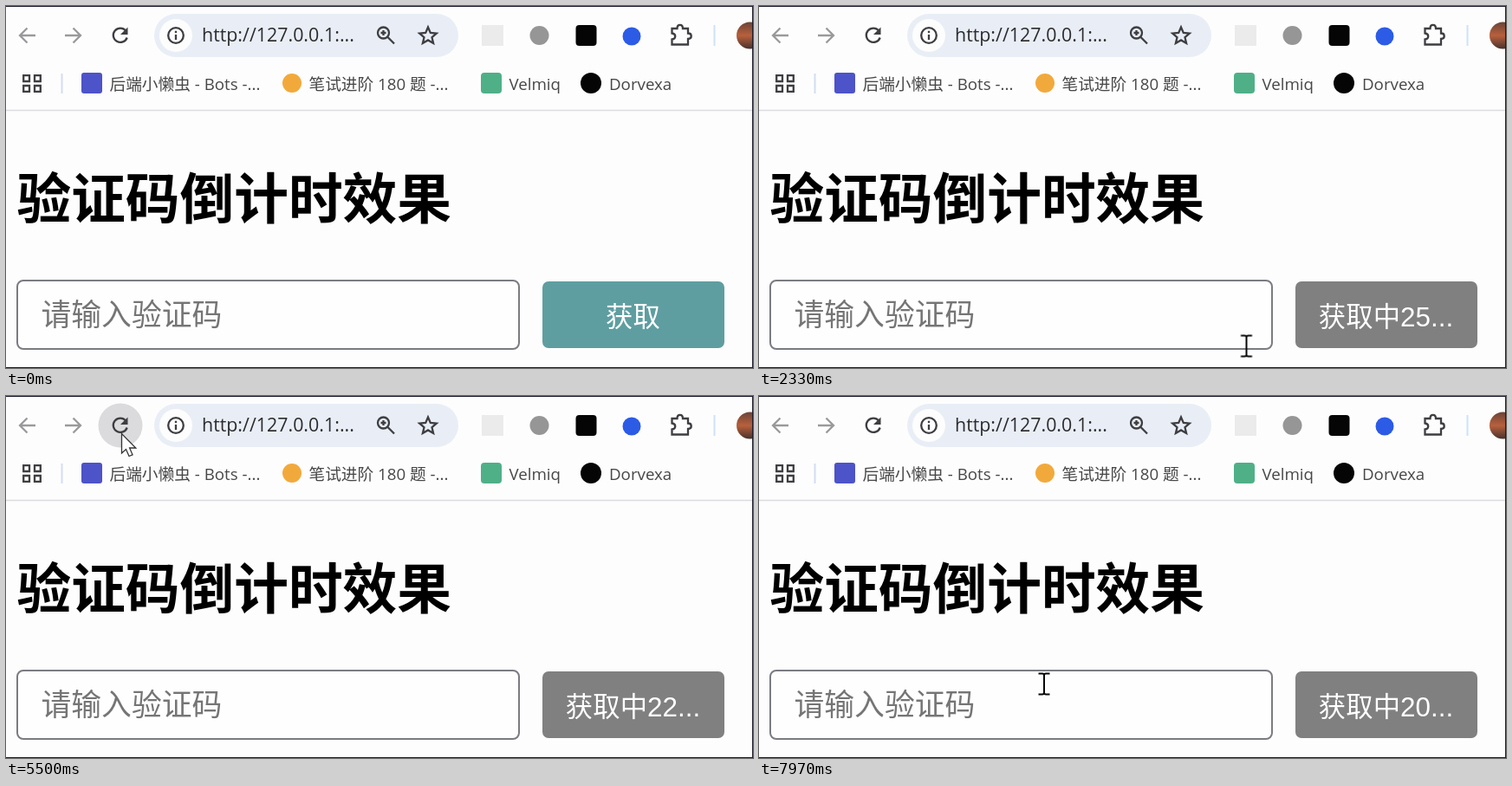
Animation, 862 px wide and 418 px high, one loop 8 s. Source, as an HTML page:

```html
<!DOCTYPE html>
<html lang="zh-CN">
<head>
<meta charset="utf-8">
<title>验证码倒计时效果</title>
<style>
  html, body { margin: 0; width: 100%; height: 100%; overflow: hidden; background: #fdfdfd; }
  svg { display: block; width: 862px; height: 418px; }
  text { font-family: "Open Sans", "Noto Sans CJK SC", sans-serif; }
  .mark { font-size: 18.7px; fill: #474747; }
  .url { font-size: 21.4px; fill: #2c2c30; }
  .title { font: 700 62.7px "Noto Sans CJK SC", sans-serif; fill: #000; }
  .hint { font: 34.8px "Noto Sans CJK SC", sans-serif; fill: #757575; }
  .label { font: 31.4px "Liberation Sans", "Noto Sans CJK SC", sans-serif; fill: #fff; text-anchor: middle; }
  .line { fill: none; stroke: #3e3e42; stroke-width: 2.3; }
  .pale { stroke: #9a9a9c; }

  .anim { animation: 8s step-end infinite; }
  .fade { animation: paint 8s linear infinite; }
  .move { animation: travel 8s linear infinite; }
  .strip { animation-name: count; }
  .hover { animation-name: hover; }
  .reload { animation-name: idle; }
  .stop { animation-name: busy; }
  .arrow { animation-name: arrow; }
  .beam { animation-name: beam; }
  .hand { animation-name: hand; }
  .deny { animation-name: deny; }

  @keyframes paint {
    0%, 18.75% { fill: #5f9ea0; }
    20.8%, 100% { fill: #808080; }
  }
  /* one 77px row per label */
  @keyframes count {
    0% { transform: translateY(0); }
    18.75% { transform: translateY(-77px); }
    32.125% { transform: translateY(-154px); }
    44.625% { transform: translateY(-231px); }
    57.125% { transform: translateY(-308px); }
    69.625% { transform: translateY(-385px); }
    98.75%, 100% { transform: translateY(-462px); }
  }
  @keyframes hover {
    0%, 74.6%, 100% { opacity: 0; }
    60.8% { opacity: 1; }
  }
  @keyframes idle {
    0%, 74.9%, 87.5%, 100% { opacity: 1; }
    73.1%, 86% { opacity: 0; }
  }
  @keyframes busy {
    0%, 74.9%, 87.5%, 100% { opacity: 0; }
    73.1%, 86% { opacity: 1; }
  }
  @keyframes travel {
    0%, 11.6% { transform: translate(649px, 420px); }
    14.6%, 26.6% { transform: translate(672px, 354px); }
    27.5% { transform: translate(652px, 349px); }
    29.125% { transform: translate(563px, 392px); }
    30.75% { transform: translate(497px, 405px); }
    32.5% { transform: translate(437px, 420px); }
    52.1%, 52.2% { transform: translate(243px, 397px); }
    61.25%, 74.4% { transform: translate(133px, 43px); }
    80.6%, 93.7% { transform: translate(113px, 396px); }
    99.4%, 100% { transform: translate(329px, 332px); }
  }
  @keyframes arrow {
    0%, 12.75%, 28.625%, 32.5%, 52.5%, 55.8%, 77%, 79.2%, 100% { opacity: 0; }
    11.625%, 28.125%, 29.8%, 52.125%, 54.2%, 57.45%, 78.1% { opacity: 1; }
  }
  @keyframes beam {
    0%, 29.8%, 54.2%, 57.45%, 78.1% { opacity: 0; }
    28.625%, 52.5%, 55.8%, 77%, 79.2%, 100% { opacity: 1; }
  }
  @keyframes hand {
    0%, 19.25%, 100% { opacity: 0; }
    12.75% { opacity: 1; }
  }
  @keyframes deny {
    0%, 28.125%, 100% { opacity: 0; }
    19.25% { opacity: 1; }
  }
</style>
</head>
<body>
<svg viewBox="0 0 862 418">
  <defs>
    <clipPath id="face"><rect x="619" y="318" width="210" height="77"/></clipPath>
    <linearGradient id="photo" x2="0" y2="1">
      <stop offset="0" stop-color="#6a4438"/>
      <stop offset=".5" stop-color="#b8603c"/>
      <stop offset="1" stop-color="#48322e"/>
    </linearGradient>
  </defs>
  <rect width="862" height="418" fill="#fdfdfd"/>

  <!-- toolbar -->
  <circle class="anim hover" cx="132" cy="34" r="25.5" fill="#dbdbdd"/>
  <path class="line pale" d="M34 34H16M24.5 25.5L16 34L24.5 42.5M68 34H86M77.5 25.5L86 34L77.5 42.5"/>
  <g class="anim reload">
    <path class="line" d="M138.3 28.5A8.2 8.2 0 1 0 139.7 36.5"/>
    <path d="M140.5 24.5V33H132Z" fill="#3e3e42"/>
  </g>
  <path class="line anim stop" d="M125.5 27.5L138.5 40.5M138.5 27.5L125.5 40.5"/>

  <rect x="171" y="9" width="351" height="50" rx="25" fill="#e9eef6"/>
  <circle cx="196" cy="34" r="19" fill="#fdfdfd"/>
  <circle class="line" cx="196" cy="34" r="8.8"/>
  <path class="line" d="M196 33V39M196 28.7V31"/>
  <text class="url" x="226" y="41">http://127.0.0.1:...</text>
  <circle class="line" cx="435.5" cy="31" r="6.5"/>
  <path class="line" d="M440.3 35.8L448 43.5M432.5 31H438.5M435.5 28V34"/>
  <path class="line" d="M487 24.5L489.8 31L496.8 31.6L491.5 36.2L493.1 43L487 39.4L480.9 43L482.5 36.2L477.2 31.6L484.2 31Z"/>

  <rect x="549" y="22" width="25" height="24" fill="#ebebeb"/>
  <circle cx="615.5" cy="34" r="11" fill="#969696"/>
  <rect x="657.5" y="22" width="24" height="24" rx="4" fill="#050505"/>
  <circle cx="722" cy="35" r="10.5" fill="#2c5be6"/>
  <path class="line" d="M768.5 26H774.5C774.5 20.5 781 20.5 781 26H787V31.5C792 31.5 792 38 787 38V44.5H768.5V38.5C773.5 38 773.5 32 768.5 31.5Z"/>
  <path d="M817.5 22V46" stroke="#cbe2fa" stroke-width="2"/>
  <circle cx="858.5" cy="34" r="15.5" fill="url(#photo)"/>

  <!-- bookmarks -->
  <path class="line" d="M20.2 80.2H27V87H20.2ZM33 80.2H39.8V87H33ZM20.2 92H27V98.8H20.2ZM33 92H39.8V98.8H33Z"/>
  <path d="M64.5 78V101" stroke="#d3dcf4" stroke-width="2"/>
  <rect x="87" y="77" width="24" height="24" rx="3" fill="#4d53c8"/>
  <text class="mark" x="119.5" y="97">后端小懒虫 - Bots -...</text>
  <circle cx="330" cy="89" r="11" fill="#f2a93c"/>
  <text class="mark" x="349.5" y="97">笔试进阶 180 题 -...</text>
  <rect x="548" y="77" width="24" height="24" rx="4" fill="#4fb088"/>
  <text class="mark" x="580.5" y="97">Velmiq</text>
  <circle cx="675" cy="89" r="12" fill="#050505"/>
  <text class="mark" x="696" y="97">Dorvexa</text>
  <path d="M0 120.5H862" stroke="#dcdce0" stroke-width="1.5"/>

  <!-- page -->
  <text class="title" x="12.5" y="245">验证码倒计时效果</text>
  <rect x="13" y="317" width="579" height="79" rx="7" fill="#fefefe" stroke="#7b7b82" stroke-width="2"/>
  <text class="hint" x="40.5" y="368.5">请输入验证码</text>
  <rect class="fade" x="619" y="318" width="210" height="77" rx="7"/>
  <g clip-path="url(#face)">
    <g class="anim strip">
      <text class="label" x="723.5" y="370">获取</text>
      <text class="label" x="723.5" y="447">获取中25...</text>
      <text class="label" x="723.5" y="524">获取中24...</text>
      <text class="label" x="723.5" y="601">获取中23...</text>
      <text class="label" x="723.5" y="678">获取中22...</text>
      <text class="label" x="723.5" y="755">获取中21...</text>
      <text class="label" x="723.5" y="832">获取中20...</text>
    </g>
  </g>

  <!-- pointer, hot spot at the origin -->
  <g class="move">
    <path class="anim arrow" d="M0.5 0.5V23L5.5 18.5L9 26.5L13 24.8L9.6 17H16.8Z" fill="#fff" stroke="#333" stroke-width="1.3"/>
    <path class="anim beam" d="M-6.5 -11.5H-2Q0 -11.5 0 -9.5Q0 -11.5 2 -11.5H6.5M0 -10V11M-6.5 12.5H-2Q0 12.5 0 10.5Q0 12.5 2 12.5H6.5" fill="none" stroke="#080808" stroke-width="2"/>
    <path class="anim hand" d="M-3 3Q-3 0.5 0 0.5T3 3V12Q7 9.5 8.5 12.5Q12 10.5 13.5 14Q17.5 13 17.5 17V23Q17.5 27 14.5 31H0Q-3 26 -8.5 20.5Q-10 17 -6.5 16.5L-3 19Z" fill="#fff" stroke="#111" stroke-width="1.5"/>
    <g class="anim deny">
      <circle r="10" fill="#fff" stroke="#c81e14" stroke-width="3.6"/>
      <path d="M-7 -7L7 7" stroke="#c81e14" stroke-width="3.6"/>
    </g>
  </g>

  <path d="M0 0.5H862M0 417.5H862M861.5 0V418" stroke="#1c1c2c"/>
</svg>
</body>
</html>
```
